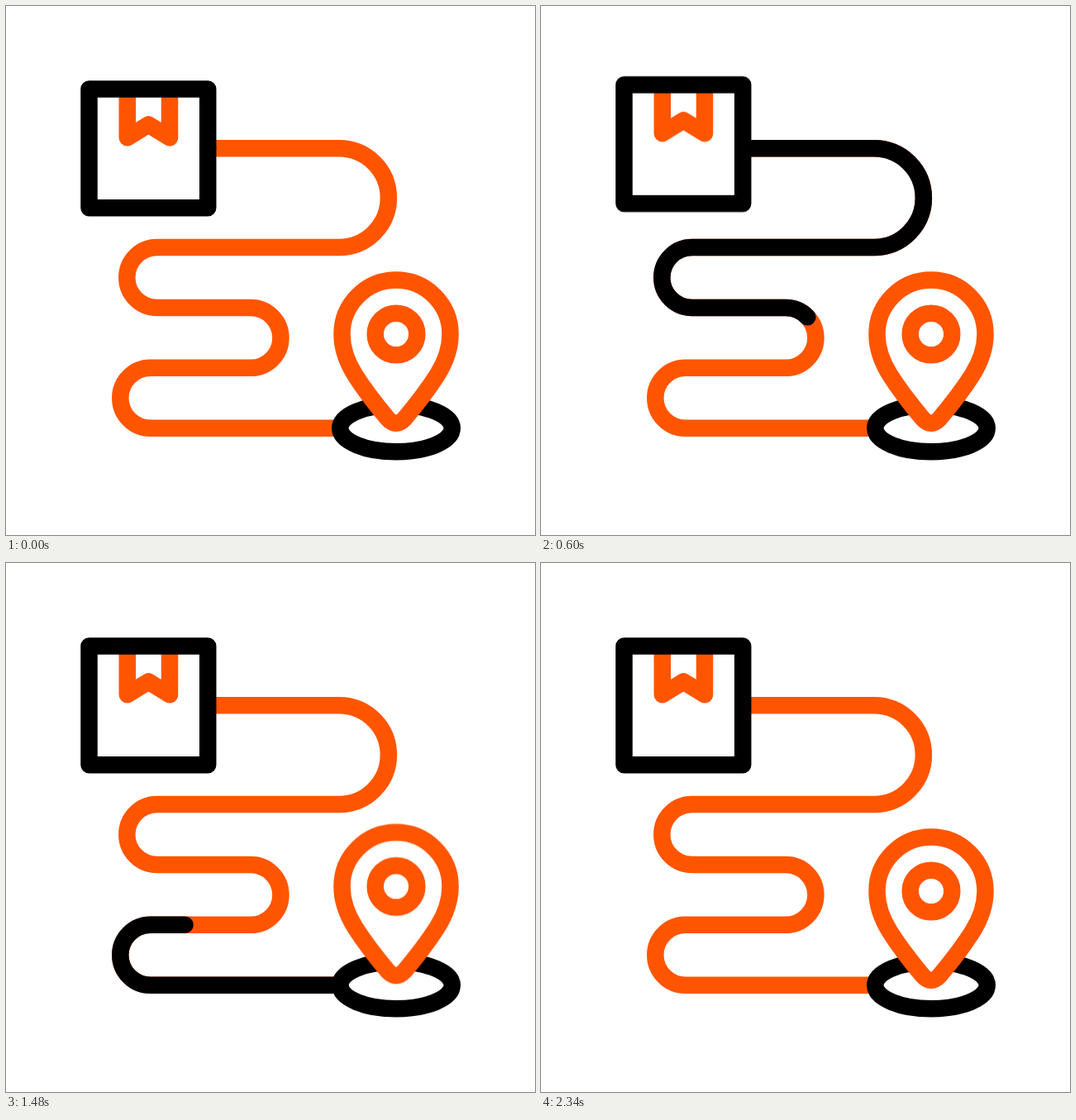
Write an HTML page that moves like this. It is 640 px wide and 640 px high and loops after 2400 ms.

```html
<!DOCTYPE html>
<html lang="en">
<head>
<meta charset="utf-8">
<title>Parcel route</title>
<style>
  @property --head { syntax: "<number>"; inherits: false; initial-value: 0; }
  @property --tail { syntax: "<number>"; inherits: false; initial-value: 0; }

  html, body {
    margin: 0;
    width: 100%;
    height: 100%;
    overflow: hidden;
    background: #fff;
  }
  svg {
    display: block;
    width: 100%;
    height: 100%;
    fill: none;
    stroke-width: 20.5px;
    stroke-linejoin: round;
  }
  .orange { stroke: #ff5500; }
  .black { stroke: #000; }
  .pin { fill: #fff; }

  .parcel, .pin, .run {
    animation: 2400ms cubic-bezier(.333, 0, .667, 1) infinite;
  }
  .parcel { animation-name: shake; }
  .pin { animation-name: hop; }

  /* The dark stretch of the route lies between --tail and --head. */
  .run {
    animation-name: head, tail;
    stroke-linecap: round;
    stroke-dasharray: calc((var(--head) - var(--tail)) * 1px) 3000px;
    stroke-dashoffset: calc(var(--tail) * -1px);
  }

  @keyframes head {
    0% { --head: 0; animation-timing-function: cubic-bezier(.31, 0, .667, 1); }
    44.75%, 100% { --head: 1000; }
  }
  @keyframes tail {
    0%, 29.17% { --tail: 0; }
    79.17%, 100% { --tail: 1000; }
  }
  @keyframes shake {
    0%, .83% { transform: translateY(0); }
    7.5% { transform: translateY(-24px); }
    14.17% { transform: translateY(24.5px); }
    20.83% { transform: translateY(-17px); }
    27.5%, 100% { transform: translateY(0); }
  }
  @keyframes hop {
    0%, 40.5%, 64.5%, 88.5%, 100% { transform: translateY(0); }
    52.5%, 76.5% { transform: translateY(-41px); }
  }
</style>
</head>
<body>
<svg viewBox="0 0 640 640">
  <defs>
    <path id="route" pathLength="1000" d="M244.2 172.3H403a59.85 59.85 0 0 1 0 119.7H182.8a36.5 36.5 0 0 0 0 73H296a36.4 36.4 0 0 1 0 72.8H174.8a36.5 36.5 0 0 0 0 73H404.3"/>
  </defs>

  <use href="#route" class="orange"/>
  <use href="#route" class="black run"/>

  <ellipse class="black" cx="472" cy="510.8" rx="67.7" ry="28.5"/>

  <g class="parcel">
    <path class="orange" d="M146.8 101V159.3L172.4 143.5L198 159.3V101"/>
    <rect class="black" x="100.5" y="100.5" width="143.7" height="143.7"/>
  </g>

  <g class="pin orange">
    <path d="M472 331.6C435.8 331.6 406.5 361 406.5 397C406.5 414 412 430 422 446C434 465 449 484 462 499.5Q472 510 482 499.5C495 484 510 465 522 446C532 430 537.5 414 537.5 397C537.5 361 508.2 331.6 472 331.6Z"/>
    <circle cx="472" cy="397" r="25.3"/>
  </g>
</svg>
</body>
</html>
```
